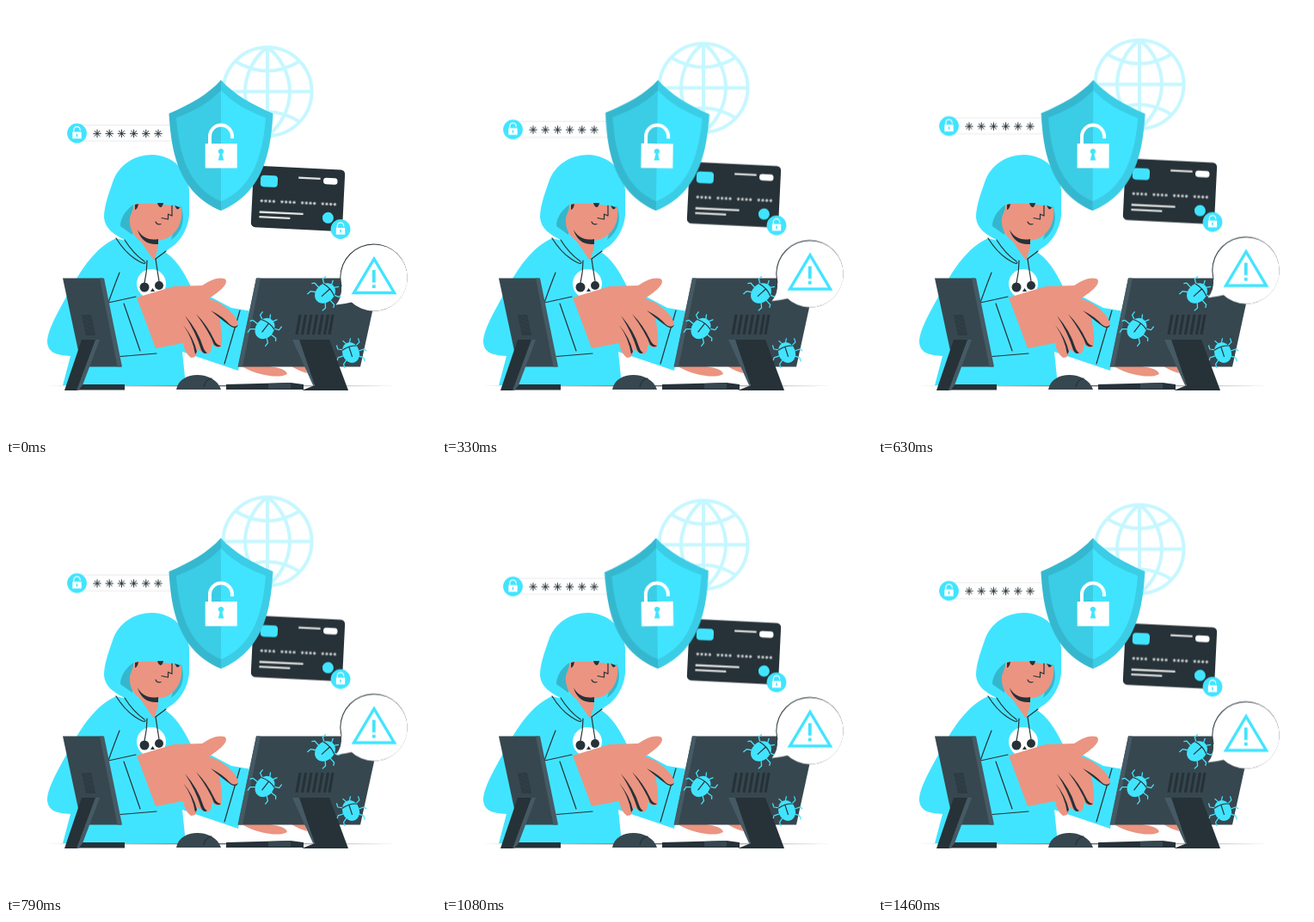
These frames come from a looping animation (500x500 px, 1.5 s). An HTML page without scripts:

```html
<!DOCTYPE html>
<html lang="en">
<head>
<meta charset="utf-8">
<title>Data theft</title>
<style>
  html, body { margin: 0; width: 100%; height: 100%; overflow: hidden; background: #fff; }
  svg { display: block; width: 100%; height: 100%; }
  .cyan { fill: #41e4ff; }
  .dark { fill: #263238; }
  .slate { fill: #37474f; }
  .edge { fill: #455a64; }
  .skin { fill: #eb9481; }
  .white { fill: #fff; }
  .shade { fill: #000; opacity: .1; }
  .ink { fill: none; stroke: #263238; stroke-width: 1.2; stroke-linecap: round; stroke-linejoin: round; }
  .globe { fill: none; stroke: #c6f7ff; stroke-width: 4; }
  .float { animation: float 1.5s linear infinite; }
  .sway { animation: sway 1.5s linear infinite; transform-box: fill-box; transform-origin: center; }
  @keyframes float { 50% { transform: translateY(-10px); } }
  @keyframes sway {
    25% { transform: rotate(1deg); }
    75% { transform: rotate(-1deg); }
  }
</style>
</head>
<body>
<svg viewBox="0 0 500 500">
  <defs>
    <path id="star" d="M0-4.3V4.3M-4.3 0H4.3M-3-3L3 3M3-3L-3 3"/>
    <g id="stars">
      <use href="#star"/><use href="#star" x="14.2"/><use href="#star" x="28.4"/>
    </g>
    <g id="digits">
      <use href="#star"/><use href="#star" x="10.2"/><use href="#star" x="20.4"/><use href="#star" x="30.6"/>
    </g>
    <g id="badge">
      <circle class="cyan" r="11.4"/>
      <rect class="white" x="-5.2" y="-1.6" width="10.4" height="7.8"/>
      <path d="M-3.7-1V-4a3.7 3.7 0 0 1 7.4 0v.8" fill="none" stroke="#fff" stroke-width="1.2"/>
      <path d="M0 .6V4" stroke="#41e4ff" stroke-width="1.5"/>
    </g>
    <g id="bug">
      <g fill="none" stroke="#41e4ff" stroke-width="1.3" stroke-linejoin="round">
        <path id="legs" d="M8-6L14-9V-14M10 1H17L19 4M8 7L13 11V16M2-12L5-17"/>
        <use href="#legs" transform="scale(-1 1)"/>
      </g>
      <ellipse class="cyan" rx="10.5" ry="13"/>
      <path class="ink" d="M-9-6Q0-9 9-6M0-7V5" stroke-width="1.3"/>
    </g>
    <path id="shield" d="M250 86C235 103 213 115 189.500 125C192 166 199 217 250 238C301 217 308 166 310.500 125C287 115 265 103 250 86Z"/>
  </defs>

  <g class="float">
    <g class="globe">
      <circle cx="304" cy="99.500" r="51.500"/>
      <path id="meridian" d="M304 48C290 58 278 78 278 99.500S290 141 304 151"/>
      <use href="#meridian" transform="translate(608) scale(-1 1)"/>
      <path d="M304 48V151M252 99.500H356M266 64Q304 87 342 64M266 135Q304 111 342 135"/>
    </g>
    <g transform="translate(339.500 223.600) rotate(2.800)">
      <rect class="dark" x="-53.200" y="-35.600" width="106.400" height="71.600" rx="5"/>
      <rect class="cyan" x="-44.500" y="-25" width="20" height="13.500" rx="4"/>
      <rect class="white" x="28.500" y="-25.500" width="16.500" height="7.600" rx="3.500"/>
      <path d="M-.5-24H25M-44 18H7M-44 23.700H-8" stroke="#e0e0e0" stroke-width="2.400"/>
      <g stroke="#e0e0e0" stroke-width="1.500" transform="translate(-42 5) scale(.46)">
        <use href="#digits"/><use href="#digits" x="51.500"/><use href="#digits" x="103"/><use href="#digits" x="154.500"/>
      </g>
      <circle class="cyan" cx="36" cy="21" r="6.500"/>
    </g>
    <use href="#badge" x="389" y="259.500"/>
    <rect x="78" y="138.500" width="130" height="18.500" fill="#fff" stroke="#ebebeb"/>
    <use href="#badge" x="82.500" y="148"/>
    <g class="ink" style="stroke-width:1"><use href="#stars" x="106" y="148.300"/><use href="#stars" x="148.600" y="148.300"/></g>
  </g>

  <path class="dark" d="M42 442L250 441.300L457 442L250 442.300Z"/>

  <!-- hooded figure -->
  <path class="cyan" d="M128 270C104 281 88 305 73 333C58 360 48 378 48 391C49 403 58 406 75 407L66 441H209L205 402L270 424L283 354.500L262 351L215 326C206 308 198 294 182 284Z"/>
  <path class="cyan" d="M170 173C150 173 131 184 124 205C118 222 114 234 114 246C115 259 126 266 138 272L160 298L174 294L190 282C203 275 212 258 213 243V214C211 190 194 174 170 173Z"/>
  <path class="shade" d="M148 231C137 239 133 248 133 256L147 266ZM203 232C209 246 206 262 192 272Z" style="opacity:.2"/>
  <path class="skin" d="M150 230Q178 228 204 235C206 249 200 265 185 271L177 273V281L172 296L156 273C146 266 143 256 144 246Z"/>
  <path class="dark" d="M153 260C158 269 166 273 177 271V277C165 278 156 272 153 260ZM150 231L154 230Q153 236 150 237ZM176 229H183Q182 234 179.500 234Q177 233 176 229ZM196 232L202 234Q201 237 198.500 236Z"/>
  <path class="ink" d="M193 232V244L188.500 242V248L181 246.500M174 251Q176 255 180 253.500"/>
  <path class="ink" d="M128 270Q138 286 150 294T162 298M138 272Q148 288 161 297M174 294L186 285"/>
  <circle class="white" cx="169" cy="323" r="17"/>
  <circle class="dark" cx="161" cy="327" r="5.500"/>
  <circle class="dark" cx="178" cy="325" r="5"/>
  <path class="dark" d="M170.500 328L173 332H168Z"/>
  <path class="ink" d="M164 296Q164 309 161 322M174 294Q176 308 178 320M132 310Q126 325 119 345M119 345L151 338M137 346L156 401M133 407.500L175 404M272 354L254 416"/>
  <path class="skin" d="M152 339L172 333L195 326L228 325C238 318 247 315 254 317C260 321 252 330 236 340L248 345C260 353 270 363 270 371C267 376 258 372 248 361C250 374 253 389 250 396C247 399 243 397 239 393Q240 404 233 405L222 399Q223 409 215 409Q208 404 206 392L174 398Z"/>
  <path class="dark" d="M238 354Q252 361 260 370Q265 375 270 371Q268 376 262 373Q252 366 238 354ZM221 358Q234 371 242 388Q245 395 250 395Q247 398 242 394Q237 380 221 358ZM208 360Q223 377 229 396Q231 402 234 403Q230 406 227 400Q221 380 208 360ZM206 371Q218 385 222 402L220 405Q217 386 206 371Z"/>
  <path class="skin" d="M274 419L283 417C303 418 326 420 327 428C319 433 295 431 274 419ZM331 418L348 419L350 427Q339 424 331 418Z"/>

  <!-- desk -->
  <path class="slate" d="M198 446C202 423 243 424 250 446Z"/>
  <path class="ink" d="M230 443Q232 434 239 433"/>
  <path class="dark" d="M256 440L331 438L346 440V446H256ZM84 440H138V446.500H84Z"/>
  <path class="slate" d="M305 439L331 438V445H305Z"/>

  <path class="slate" d="M66 316.400H112L134 419.500H88Z"/>
  <path class="edge" d="M109 316.400H114L135 419.500H129.500Z"/>
  <path class="dark" d="M88 359H99L104 383H93Z" opacity=".55"/>
  <path d="M90 364L100 369M91 369L101 374M92 374L102 379M89 359L99 364" stroke="#37474f" stroke-width=".7"/>
  <path class="edge" d="M99 388H109L89 441L84 447H78Z"/>
  <path class="dark" d="M88 388H104L82 447H68Z"/>

  <path class="slate" d="M291 316.400H434.500L412 419.500H270Z"/>
  <path class="edge" d="M291 316.400H296L275 419.500H269.500Z"/>
  <path d="M338 382L342 359M344.500 382L348.500 359M351 382L355 359M357.500 382L361.500 359M364 382L368 359M370.500 382L374.500 359M376 382L380 359" stroke="#263238" stroke-width="3.200"/>
  <path class="edge" d="M333 388H342L363 440L357 441Z"/>
  <path class="dark" d="M341 388H376L398 447H344L359 441Z"/>

  <use href="#bug" transform="translate(371 334) rotate(48)"/>
  <use href="#bug" transform="translate(301 375) rotate(38)"/>
  <use href="#bug" transform="translate(401 403) rotate(-18) scale(.94)"/>

  <g class="sway">
    <use href="#shield" fill="#3bcde6"/>
    <path class="cyan" d="M250 98C236 113 219 122 198 130C201 169 211 211 250 227C289 211 299 169 302 130C281 122 264 113 250 98Z"/>
    <path class="shade" d="M250 86C235 103 213 115 189.500 125C192 166 199 217 250 238Z"/>
    <rect class="white" x="231.700" y="160" width="37" height="28.500"/>
    <path d="M237 161V151.500a13 13 0 0 1 26 0V154" fill="none" stroke="#fff" stroke-width="4"/>
    <path class="cyan" d="M248.600 172L246.800 179.500H253.200L251.400 172A3.200 3.200 0 1 0 248.600 172Z"/>
  </g>

  <g class="float">
    <circle class="dark" cx="427.500" cy="315.700" r="39.200"/>
    <circle class="white" cx="428" cy="316.100" r="38.700"/>
    <path class="white" d="M390 326Q391 339 383.500 347.500Q394 346.500 404 344L410 330Z"/>
    <path d="M428 294L404.500 333.500H451.500Z" fill="none" stroke="#41e4ff" stroke-width="3.400"/>
    <path d="M427.800 307V321.500M427.800 324.200V328" stroke="#41e4ff" stroke-width="3.800"/>
  </g>
</svg>
</body>
</html>
```
